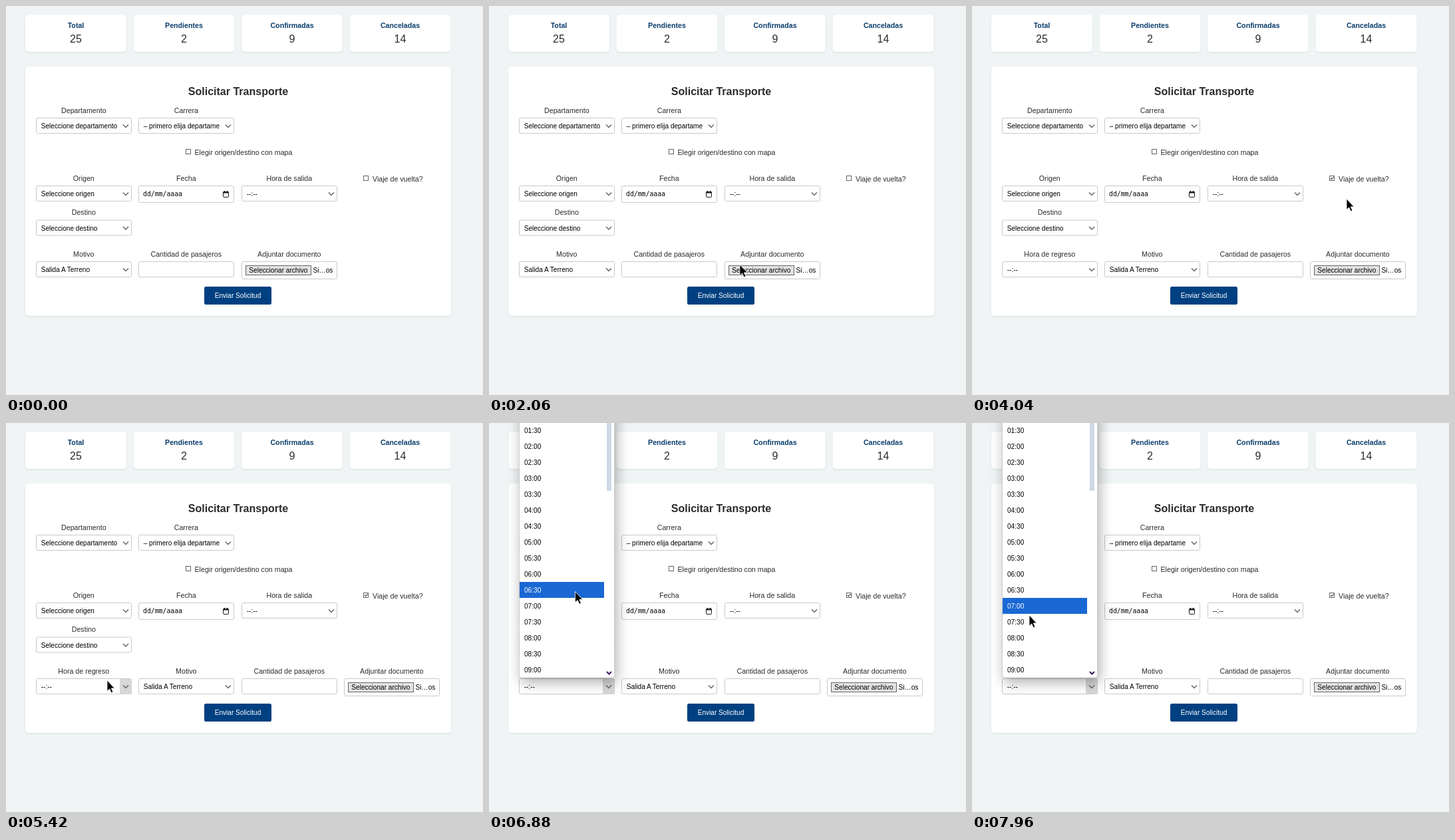
An HTML page for the animation above (7.99 s loop, 717 by 585 pixels).

```html
<!DOCTYPE html>
<html lang="es">
<head>
<meta charset="utf-8">
<title>Solicitar Transporte</title>
<style>
  html, body { margin: 0; width: 100%; height: 100%; overflow: hidden; background: #f0f4f5; }
  svg { display: block; width: 100%; height: 100%; }
  text { font: 10.67px "Liberation Sans", Arial, sans-serif; fill: #2b2b2b; white-space: pre; }
  .mid { text-anchor: middle; }
  .stat { font-weight: bold; fill: #0a3d6b; }
  .count { font-size: 16px; }
  .title { font-size: 16px; font-weight: bold; }
  .ctl { font-size: 10.1px; fill: #000; }
  .mono { font: 9.8px "DejaVu Sans Mono", monospace; fill: #000; }
  .card { fill: #fff; filter: drop-shadow(0 1px 1px rgba(0, 40, 50, .1)); }
  .field { fill: #fff; stroke: #c9c9c9; }
  .chevron { fill: none; stroke: #666; stroke-width: 1.5; }
  .box { fill: #fff; stroke: #666; }
  .menu { fill: #fff; filter: drop-shadow(3px 7px 10px rgba(0, 0, 0, .32)); }
</style>
</head>
<body>
<svg id="stage" viewBox="0 0 717 585"></svg>
<script>
const LOOP = 7990, CLICK = 3630, TOGGLE = 3660, OPEN = 5580;
const ROW = 24, ROWS = 16;
const COLS = [45, 199, 354, 508];

// Circling of the pointer around the form, counterclockwise.
function circle(t) {
  const a = 2 * Math.PI * (t - 1060) / 775;
  const rx = 225 - .0413 * (t - 1060), ry = 158 + .0166 * (t - 1254);
  return [t, 344 - rx * Math.cos(a), 203 + .02 * (t - 1254) + ry * Math.sin(a)];
}

// Pointer strokes: [time, x, y]; the pointer rests between strokes.
const enter = [[80, 655, 585], [260, 614, 488], [480, 578, 300], [650, 520, 150], [780, 410, 75], [890, 272, 60]];
const turns = Array.from({ length: 12 }, (_, i) => circle(980 + i * 90));
const settle = [[2060, 377, 389], [2200, 470, 365], [2340, 508, 332], [2460, 515, 318], [3100, 541, 264], [3290, 542, 259]];
const toSelect = [[3900, 542, 259], [4040, 563, 290], [4200, 545, 318], [4340, 480, 327], [4700, 293, 328], [5050, 212, 386], [5420, 152, 387]];
const toMenu = [[6150, 152, 387], [6280, 148, 362]];
const browse = [[6410, 148, 362], [6900, 128, 245], [7220, 119, 193], [7330, 115, 169], [7490, 105, 149], [7850, 90, 252], [7960, 86, 289]];
const strokes = [enter.concat(turns, settle), toSelect, toMenu, browse];

const text = (x, y, s, cls = "") => `<text x="${x}" y="${y}" class="${cls}">${s}</text>`;
const label = (col, y, s) => text(COLS[col] + 71.8, y, s, "mid");
const rect = (x, y, w, h, r, cls) =>
  `<rect x="${x}" y="${y}" width="${w}" height="${h}" rx="${r}" class="${cls}"/>`;
const field = (col, y, h = 23) => rect(COLS[col] + .5, y + .5, 143, h, 2, "field");
const chevron = (x, y) => `<path class="chevron" d="M${x - 4} ${y - 2}l4 4 4-4"/>`;

const select = (col, y, s) => {
  const x = COLS[col];
  return field(col, y) +
    `<rect data-x="${x}" data-y="${y}" class="hover" x="${x + 126}" y="${y + 1}" width="17.5" height="22.5" fill="#d8d8d8" visibility="hidden"/>` +
    text(x + 7.7, y + 16, s, "ctl") + chevron(x + 135, y + 12.5);
};

const fileInput = col => {
  const x = COLS[col];
  return field(col, 384, 26) +
    `<rect x="${x + 6.5}" y="390.5" width="98" height="14" fill="#e2e2e4" stroke="#666"/>` +
    text(x + 11.3, 401.3, "Seleccionar archivo", "ctl") + text(x + 107.6, 401.3, "Si…os", "ctl");
};

const lastRow = c =>
  label(c, 377, "Motivo") + select(c, 384, "Salida A Terreno") +
  label(c + 1, 377, "Cantidad de pasajeros") + field(c + 1, 384) +
  label(c + 2, 377, "Adjuntar documento") + fileInput(c + 2);

const stats = [["Total", 25], ["Pendientes", 2], ["Confirmadas", 9], ["Canceladas", 14]]
  .map(([name, n], i) => {
    const x = 29 + i * 162.5, mid = x + 76;
    return rect(x, 13, 152, 56, 5, "card") + text(mid, 33, name, "mid stat") + text(mid, 55, n, "mid count");
  }).join("");

const calendar =
  `<rect x="326.5" y="280.5" width="8" height="7" rx="1" fill="none" stroke="#111"/>` +
  `<path d="M326 280.5h9M328.5 278v2M332.5 278v2" stroke="#111" stroke-width="2"/>`;

const hours = Array.from({ length: ROWS }, (_, i) => {
  const half = i + 3;
  const s = String(half >> 1).padStart(2, "0") + (half % 2 ? ":30" : ":00");
  return text(53, 15 + i * ROW, s, "ctl hour");
}).join("");

const stage = document.getElementById("stage");
stage.innerHTML =
  stats + rect(29, 91, 640, 375, 5, "card") +
  text(349, 134, "Solicitar Transporte", "mid title") +
  label(0, 161, "Departamento") + select(0, 168, "Seleccione departamento") +
  label(1, 161, "Carrera") + select(1, 168, "– primero elija departame") +
  rect(270.5, 215.5, 7, 7, 0, "box") + text(283.5, 224, "Elegir origen/destino con mapa") +
  label(0, 263, "Origen") + select(0, 270, "Seleccione origen") +
  label(1, 263, "Fecha") + field(1, 270, 25) + text(206, 286, "dd/mm/aaaa", "mono") + calendar +
  label(2, 263, "Hora de salida") + select(2, 270, "--:--") +
  `<rect id="check" x="537.5" y="255.5" width="7" height="7" stroke="#666"/>` +
  `<path id="tick" d="M539 259l1.6 1.7 3-3.6" fill="none" stroke="#444" stroke-width="1.1"/>` +
  text(551, 264, "Viaje de vuelta?") +
  label(0, 314, "Destino") + select(0, 321.5, "Seleccione destino") +
  `<g id="oneWay">${lastRow(0)}</g>` +
  `<g id="roundTrip">${label(0, 377, "Hora de regreso")}${select(0, 384, "--:--")}${lastRow(1)}</g>` +
  `<rect x="298" y="422" width="101" height="27" rx="2.5" fill="#004080"/>` +
  `<text x="348.5" y="439" class="mid" style="font-size:10.1px;fill:#fff">Enviar Solicitud</text>` +
  `<g id="popup">${rect(45.5, -30, 143, 413, 4, "menu")}
    <rect x="45.5" y="-30" width="143" height="413" rx="4" fill="#fff" stroke="#bbb" stroke-width=".7"/>
    <rect x="177" y="-10" width="7" height="112" fill="#cfd9e5"/>
    <path d="M177 374l3.5 3.5 3.5-3.5" fill="none" stroke="#3a1a5c" stroke-width="2"/>
    <rect id="mark" x="46" width="127" height="${ROW}" fill="#1a68d3"/>${hours}</g>` +
  `<path id="pointer" d="M0 0V16.3L3.7 12.9 6.3 18.8 8.9 17.6 6.3 11.9H11.2Z" fill="#000" stroke="#fff" stroke-width=".8"/>`;

const $ = id => document.getElementById(id);
const show = (el, on) => el.setAttribute("visibility", on ? "visible" : "hidden");
const toggle = (el, on) => { el.style.display = on ? "" : "none"; };
const hovers = [...document.querySelectorAll(".hover")];
const hourTexts = [...document.querySelectorAll(".hour")];

// Smooth curve through the keys of one stroke.
function along(keys, t) {
  let i = 0;
  while (i < keys.length - 2 && t > keys[i + 1][0]) i++;
  const a = keys[i], b = keys[i + 1];
  const p = keys[Math.max(i - 1, 0)], n = keys[Math.min(i + 2, keys.length - 1)];
  const d = b[0] - a[0], u = Math.min(1, Math.max(0, (t - a[0]) / d));
  return [1, 2].map(k => {
    const m0 = (b[k] - p[k]) / (b[0] - p[0]) * d;
    const m1 = (n[k] - a[k]) / (n[0] - a[0]) * d;
    const u2 = u * u, u3 = u2 * u;
    return (2 * u3 - 3 * u2 + 1) * a[k] + (u3 - 2 * u2 + u) * m0 +
      (3 * u2 - 2 * u3) * b[k] + (u3 - u2) * m1;
  });
}

function pointerAt(t) {
  let keys = strokes[0];
  for (const s of strokes) if (t >= s[0][0]) keys = s;
  return along(keys, t);
}

function sample(t) {
  const shift = t < 7225 ? 20 : 10;
  return Math.floor((t - shift) / 30) * 30 + shift;
}

function draw(t) {
  const now = sample(t);
  const [x, y] = pointerAt(now);
  const returning = t >= TOGGLE, open = t >= OPEN;

  show($("pointer"), t >= 100);
  $("pointer").setAttribute("transform", `translate(${x.toFixed(1)} ${y.toFixed(1)})`);
  toggle($("oneWay"), !returning);
  toggle($("roundTrip"), returning);
  show($("tick"), returning);
  $("check").setAttribute("fill", t >= CLICK && t < TOGGLE ? "#ccc" : "#fff");

  for (const h of hovers) {
    const hx = +h.dataset.x, hy = +h.dataset.y;
    const over = x >= hx && x < hx + 144 && y >= hy && y < hy + 24;
    show(h, open ? hx === COLS[0] && hy === 384 : t >= 100 && over);
  }

  toggle($("popup"), open);
  $("popup").style.opacity = Math.min(1, (t - OPEN + 40) / 150);

  // The highlighted row trails the pointer by one sample.
  const trail = pointerAt(now - 30)[1];
  const row = t >= 6200 ? Math.min(ROWS - 1, Math.floor((trail + 1) / ROW)) : -1;
  show($("mark"), row >= 0);
  $("mark").setAttribute("y", row * ROW - 1);
  hourTexts.forEach((el, i) => { el.style.fill = i === row ? "#fff" : "#000"; });
}

const start = performance.now();
function frame() {
  draw((performance.now() - start) % LOOP);
  requestAnimationFrame(frame);
}
frame();
</script>
</body>
</html>
```
